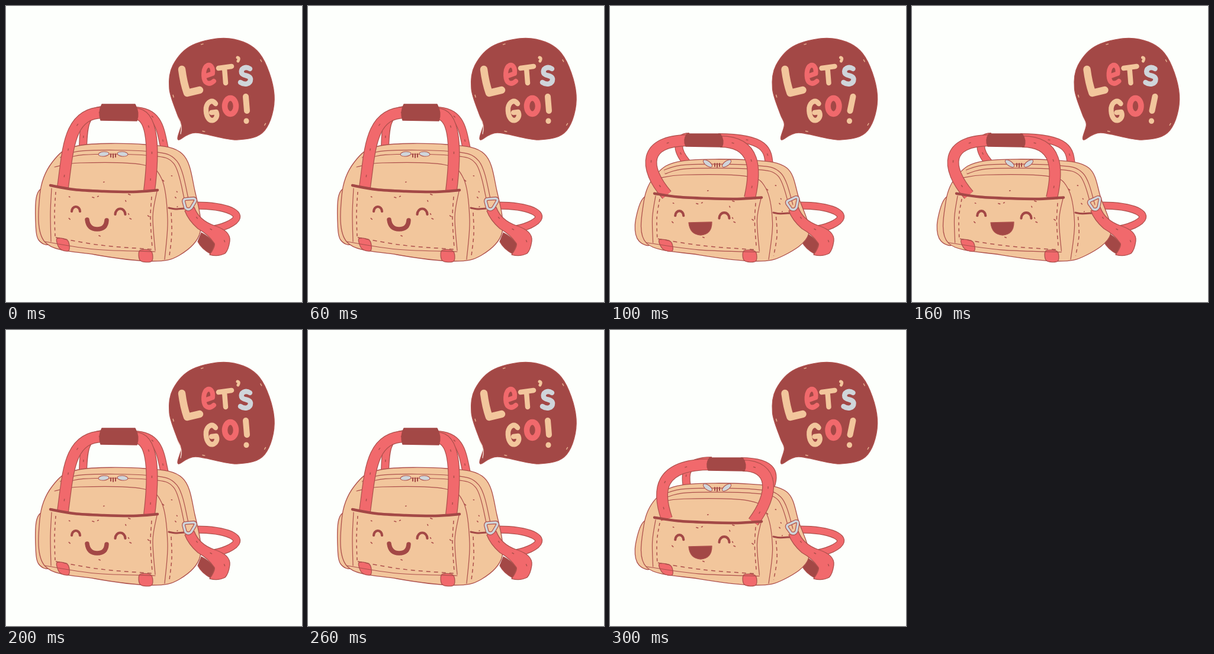
An HTML page for the animation above (400 ms loop, 500 by 500 pixels).

```html
<!DOCTYPE html>
<html lang="en">
<head>
<meta charset="utf-8">
<title>Let's go!</title>
<style>
  html, body { margin: 0; width: 100%; height: 100%; overflow: hidden; background: #fdfffc; }
  svg { display: block; width: 100%; height: 100%; }
  path { stroke-linejoin: round; }
  .round { stroke-linecap: round; }
  .tall, .squat, .left, .right { animation: 400ms step-end infinite; }
  .tall { animation-name: tall; }
  .squat { animation-name: squat; }
  .left { animation-name: left; }
  .right { animation-name: right; }
  @keyframes tall { 0%, 50% { visibility: visible } 25%, 75%, 100% { visibility: hidden } }
  @keyframes squat { 0%, 50% { visibility: hidden } 25%, 75%, 100% { visibility: visible } }
  @keyframes left { 0%, 50%, 75%, 100% { visibility: hidden } 25% { visibility: visible } }
  @keyframes right { 0%, 25%, 50% { visibility: hidden } 75%, 100% { visibility: visible } }
</style>
</head>
<body>
<svg id="stage" viewBox="0 0 500 500" role="img" aria-label="Let's go!"></svg>
<script>
const sand = '#f2c69c', pink = '#f1696c', wine = '#a34846', line = '#ad504c', steel = '#cfd5da';

const path = (d, fill, color, width, extra = '') =>
  `<path d="${d}" fill="${fill}" stroke="${color}" stroke-width="${width}" ${extra}/>`;
const shape = (d, fill) => path(d, fill, line, 1.3);
const stroke = (d, width = 1.2, color = line) => path(d, 'none', color, width, 'class="round"');
const dashes = (d, pattern, color = line) => path(d, 'none', color, 1.5, `stroke-dasharray="${pattern}"`);
const tube = (d, width, color) => path(d, 'none', line, width) + path(d, 'none', color, width - 2.4);
const group = (cls, ...parts) => `<g class="${cls}">${parts.join('')}</g>`;

// The bag sinks towards its base while its sides bulge.
const upright = (x, y) => [x, y];
function sunk(x, y) {
  const height = Math.max(0, (430 - y) / 195);
  const belly = Math.sin(Math.PI * Math.min(1, Math.max(0, (y - 320) / 110)));
  return [x + 8 * belly * ((x - 190) / 140) ** 3, y + 26 * height ** 1.5];
}

// Smooth path through posed "x,y" points.
function curve(text, pose, closed = false) {
  const p = text.split(' ').map(s => pose(...s.split(',').map(Number)));
  const n = p.length;
  const at = i => closed ? p[(i + n) % n] : p[Math.max(0, Math.min(n - 1, i))];
  let d = `M${p[0]}`;
  for (let i = 0; i < n - !closed; i++) {
    const [a, b, c, e] = [-1, 0, 1, 2].map(k => at(i + k));
    const lead = b.map((v, k) => v + (c[k] - a[k]) / 6);
    const tail = c.map((v, k) => v - (e[k] - b[k]) / 6);
    d += `C${lead} ${tail} ${c}`;
  }
  return d + (closed ? 'Z' : '');
}

function specks(count, pose) {
  let seed = 7, out = '';
  const random = () => (seed = seed * 16807 % 2147483647) / 2147483647;
  random();
  for (let i = 0; i < count; i++) {
    const [x, y] = pose(95 + 210 * random(), 280 + 115 * random());
    out += stroke(`M${x} ${y}l${4 * random()} ${4 * random() - 2}`, 1.6);
  }
  return out;
}

function bag(pose) {
  const at = (text, closed) => curve(text, pose, closed);
  return [
    shape(at('66,310 52,320 50,365 55,395 75,400 85,350', true), sand),
    shape(at('66,399 57,320 78,264 122,236 235,234 298,250 319,312 328,382 293,421 246,431 150,420', true), sand),
    tube(at('92,259 130,248 240,249 286,264 305,327'), 8, sand),
    stroke(at('82,272 125,265 230,268 263,292 273,360 268,428')),
    stroke(at('77,308 75,350 76,398')),
    stroke(at('255,313 248,355 252,413')),
    shape(at('86,393 104,396 106,413 91,410', true), pink),
    shape(at('226,413 245,414 246,431 227,430', true), pink),
    stroke(at('66,398 150,411 252,415')),
    dashes(at('84,314 82,350 83,390'), '5 5'),
    dashes(at('84,391 160,404 247,411'), '7 6'),
    dashes(at('246,322 244,360 247,408'), '6 5'),
    dashes(at('279,349 280,385 276,422'), '6 5'),
    stroke(at('275,341 286,343 301,342'), 3, wine),
    specks(16, pose)
  ].join('');
}

function face(pose, mouth) {
  const eye = (x, y, r) => {
    const [cx, cy] = pose(x, y);
    return stroke(`M${cx - r} ${cy}a${r} ${r + 1} 0 0 1 ${2 * r} 0`, 4.2, wine);
  };
  return stroke(curve('75,303 115,310 165,313 215,314 256,311', pose), 4.5, wine)
    + eye(118, 347, 7) + eye(193, 352, 8.5) + mouth;
}

function zipPulls(y, turn) {
  const pull = side => `<ellipse rx="9" ry="4" fill="${steel}" stroke="${line}"
    transform="translate(${181 + 16 * side} ${y}) rotate(${turn * side})"/>`;
  return pull(-1) + pull(1) + stroke(`M177 ${y}v5m4 -5v6m4 -6v5`, 2, wine);
}

// A handle leg rises from the bag, swings out to `bow` and meets the grip.
function leg([x, y], handX, handY, bow, width) {
  const d = `M${x} ${y}C${bow} ${(y + handY) / 2} ${bow} ${handY} ${handX} ${handY}`;
  return tube(d, width, pink) + dashes(d, '0 17 4 24');
}
const backHandle = (pose, x, y, bowLeft, bowRight) =>
  leg(pose(130, 240), x + 8, y + 7, bowLeft, 14) + leg(pose(269, 246), x + 57, y + 8, bowRight, 14);
const frontHandle = (pose, x, y, h, bowLeft, bowRight, rightBase = 242) =>
  leg(pose(96, 306), x + 6, y + h / 2, bowLeft, 20)
  + leg(pose(rightBase, 312), x + 60, y + h / 2 + 2, bowRight, 20)
  + path(`M${x + 4} ${y}h56q8 ${h / 2} 3 ${h}l-61 -1q-5 ${-h / 2} 2 ${1 - h}z`, wine, wine, 1.5);

const looseStrap = tube('M320 337Q360 337 380 346Q402 357 374 370Q360 376 344 378', 13, pink)
  + shape('M330 383Q344 390 353 402L346 419Q330 410 324 398Z', wine);
const frontStrap = shape('M302 346L318 340Q326 362 352 371Q380 380 378 397Q376 412 370 418Q358 424 344 420Q354 406 352 401Q342 386 324 376Q308 362 302 346Z', pink)
  + dashes('M315 346Q326 368 350 379T370 412', '0 12 4 15');
const buckle = turn => `<g transform="rotate(${turn} 310 334)">`
  + tube('M300 330Q300 326 304 326L317 325Q322 326 319 331L313 341Q308 346 303 341Z', 6, steel) + '</g>';

const balloon = curve('291,226 296,200 289,182 276,140 282,100 315,66 377,55 428,80 453,150 437,210 390,226 320,214', upright, true);
const bubble = shape(balloon, wine)
  + `<g transform="translate(18 7) scale(.95)">${dashes(balloon, '0 75 5 38', '#e7b391')}</g>`;
const word = [
  stroke('M297 107Q300 130 306 147L327 142', 12.5, sand),
  stroke('M335 119L349 114C350 104 346 99 341 100C332 104 333 122 337 128Q343 134 351 127', 8, pink),
  stroke('M359 105L381 102M369 105L371 130', 8.5, sand),
  stroke('M391 87Q395 88 392 93', 5, sand),
  stroke('M412 106C404 101 396 106 398 113C400 119 413 116 413 124C413 132 403 134 396 129', 8.5, steel),
  stroke('M354 165C348 157 340 162 338 172C337 186 343 195 350 193C357 190 357 183 355 179L347 180', 8.5, sand),
  `<ellipse cx="379" cy="169" rx="9.5" ry="13.5" fill="none" stroke="${pink}" stroke-width="9.5"/>`
].join('');
const shout = top => stroke(`M${top} 153L407 177`, 10, sand) + stroke('M406 194v.5', 9, sand);

document.getElementById('stage').innerHTML = [
  looseStrap,
  group('tall',
    backHandle(upright, 158, 169, 131, 261), bag(upright), zipPulls(250, 5),
    frontHandle(upright, 158, 166, 28, 105, 250),
    face(upright, stroke('M137 361Q139 377 154 377Q169 377 170 362', 7.5, wine))),
  group('left', backHandle(sunk, 126, 214, 111, 267)),
  group('right', backHandle(sunk, 164, 214, 126, 280)),
  group('squat', bag(sunk), zipPulls(266, -36)),
  group('left', frontHandle(sunk, 126, 216, 22, 56, 247, 236)),
  group('right', frontHandle(sunk, 164, 216, 22, 80, 278)),
  group('squat', face(sunk, shape('M133 366L172 365Q172 386 153 387Q135 386 133 366Z', wine))),
  frontStrap,
  group('tall', buckle(0), bubble, stroke('M290 188Q299 201 295 216', 1.3, '#f3ddd3'), word, shout(405)),
  group('squat', buckle(-20),
    `<g transform="translate(-1.5 0)">${bubble}${word}${shout(412)}</g>`)
].join('');
</script>
</body>
</html>
```
